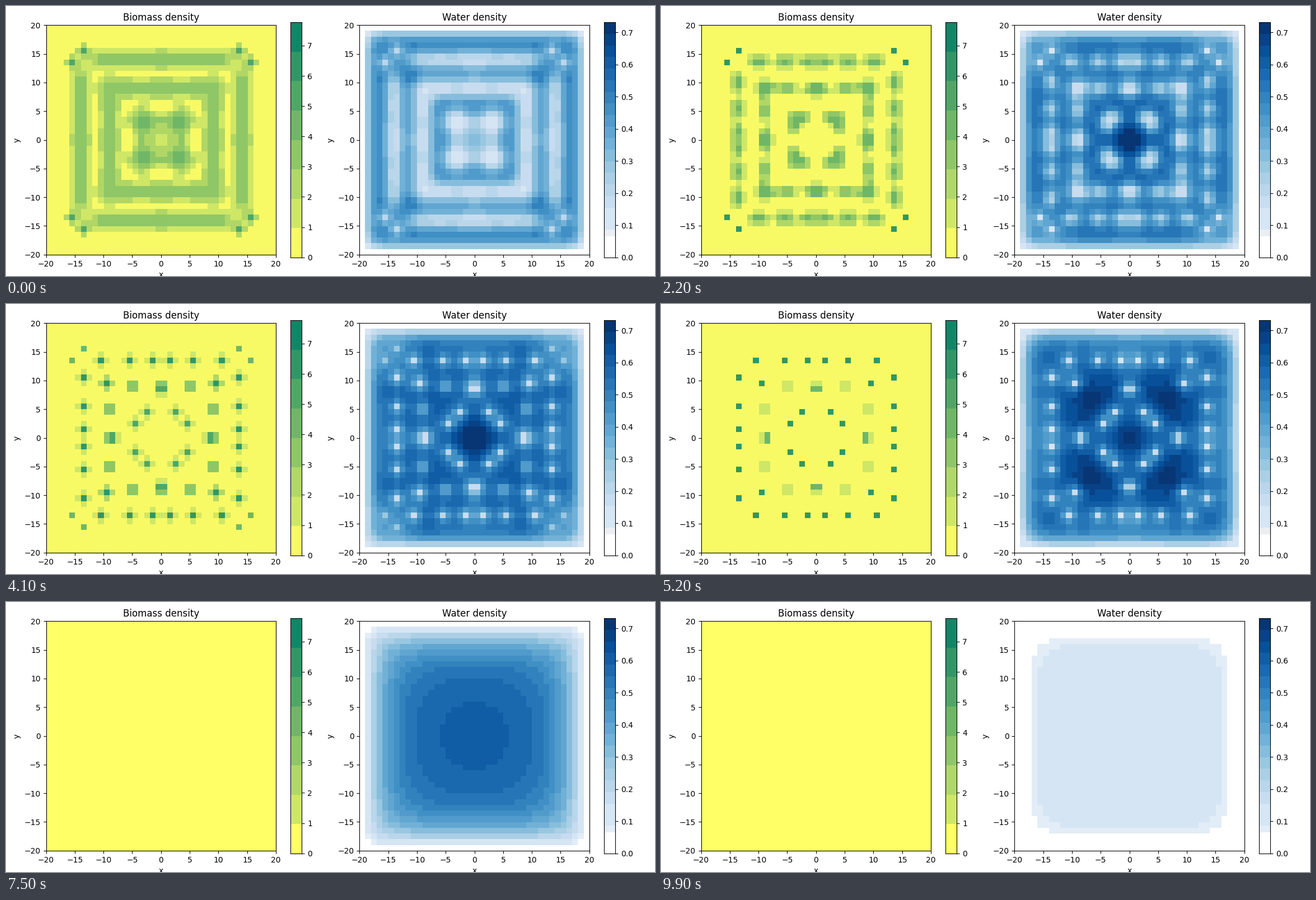
A matplotlib script that plays this animation: 1159x483 px, repeating every 10 s.

```python
import numpy as np
import matplotlib.pyplot as plt
from matplotlib.animation import FuncAnimation
from matplotlib.colors import BoundaryNorm, ListedColormap

W, H, DPI = 1159, 483, 100
FRAMES, STEP = 100, 100
N = 20                      # cells per quadrant side
V_MAX, W_MAX = 7.77, 0.7315
BARE = 7.4                  # seconds until the last plant is gone

# Clumps on square rings: start (across, along), end, birth, death in seconds.
CLUMPS = [
    ((14, 1.2), (13.5, 1.5), 0, 6.9),
    ((14, 5.5), (13.5, 5.5), 0, 6.9),
    ((14, 9.5), (13.5, 10.5), 0, 6.9),
    ((15.5, 13.5), (15.5, 13.5), -4, 4.4),
    ((9, 0), (8.7, 0), 0, BARE),
    ((9, 5), (9, 5), 0, 6.9),
    ((9, 7.5), (9.5, 9.5), 0, 6.9),
    ((3.3, 3), (4.5, 2.5), 0, 7.2),
]

# Shape of a clump over its life: a band shrinks to one dense cell.
AGES = [0, 0.22, 0.45, 0.75, 1]
ACROSS = [1.65, 1.1, 1.1, 0.6, 0.55]
ALONG = [3.5, 2.2, 1.15, 0.6, 0.55]
PEAK = [3.8, 4.3, 5.4, 6.4, 5.8]

CELL = np.arange(N) + 0.5
I, J = np.meshgrid(CELL, CELL, indexing="ij")


def smooth(x):
    x = np.clip(x, 0, 1)
    return x * x * (3 - 2 * x)


def biomass(t):
    """One quadrant: clumps mirrored in the axes and in the diagonal."""
    square, total, weighted = (np.zeros((N, N)) for _ in range(3))
    for start, end, birth, death in CLUMPS:
        age = (t - birth) / (death - birth)
        alive = np.clip((death - t) / 0.4, 0, 1)
        a, b = np.array(start) + smooth(age / 0.6) * np.subtract(end, start)
        wide, deep, peak = (np.interp(age, AGES, c) for c in (ALONG, ACROSS, PEAK))
        for side in (b, -b):
            g = alive * np.exp(-((I - a) / deep) ** 2 - ((J - side) / wide) ** 2)
            for part in (g, g.T):
                square += part ** 2
                total += part
                weighted += peak * part
    heart = 1.6 * max(0, 1 - t) * np.exp(-(I ** 2 + J ** 2) / 9)
    return weighted / (total + 1e-9) * np.minimum(1, np.sqrt(square)) + heart


# Water balance: rain - evaporation - uptake + diffusion, zero at the border.
M = N - 1
T = np.diag(np.full(M, -2.0)) + np.eye(M, k=1) + np.eye(M, k=-1)
T[0, 0] = -1
LAP = np.kron(T, np.eye(M)) + np.kron(np.eye(M), T)
DIFFUSION = 16


def water(t, b):
    rain = np.interp(t, [0, 3.1, 5.2, BARE, 9.9], [2.35, 1.8, 1.4, 0.635, 0.155])
    uptake = 0.43 * b[:M, :M].ravel() ** 3
    w = np.linalg.solve(np.diag(1 + uptake) - DIFFUSION * LAP, np.full(M * M, rain))
    return np.pad(w.reshape(M, M), ((0, 1), (0, 1)))


def mirror(q):
    half = np.hstack([q[:, ::-1], q])
    return np.vstack([half[::-1], half])


V_EDGES = np.linspace(0, V_MAX, 9)
W_EDGES = np.r_[0, 0.066, 0.086, np.linspace(0.155, W_MAX, 17)]


def mids(edges):
    return (edges[1:] + edges[:-1]) / 2


def palettes(name, edges, early, late):
    """Two stepped colormaps that differ in the first colours."""
    maps = []
    for first in (early, late):
        colors = plt.get_cmap(name)(mids(edges) / edges[-1])[:, :3]
        colors[:len(first)] = np.array(first) / 255
        maps.append(ListedColormap(colors))
    return maps


V_MAPS = palettes("summer_r", V_EDGES, [(248, 250, 101)], [(255, 255, 102)])
W_MAPS = palettes("Blues", W_EDGES, [(255, 255, 255), (235, 238, 243)],
                  [(255, 255, 255), (226, 237, 247)])

fig = plt.figure(figsize=(W / DPI, H / DPI), dpi=DPI, facecolor="white")


def add_axes(x0, x1, y0, y1):
    return fig.add_axes([x0 / W, 1 - y1 / H, (x1 - x0) / W, (y1 - y0) / H])


def panel(title, x0, bar_x, edges, maps, ticks, fmt):
    norm = BoundaryNorm(edges, len(edges) - 1)
    ax = add_axes(x0, x0 + 410.6, 34.2, 444.8)
    img = ax.imshow(np.zeros((2 * N, 2 * N)), extent=(-N, N, -N, N), origin="lower",
                    cmap=maps[0], norm=norm, interpolation="nearest", aspect="auto")
    ax.set_title(title)
    ax.set_xlabel("x")
    ax.set_ylabel("y")
    ax.set_xticks(range(-N, N + 1, 5))
    ax.set_yticks(range(-N, N + 1, 5))

    cax = add_axes(bar_x, bar_x + 20.6, 29.3, 449.7)
    bar = cax.pcolormesh([0, 1], edges, mids(edges)[:, None], cmap=maps[0], norm=norm)
    cax.set_xticks([])
    cax.yaxis.tick_right()
    cax.set_yticks(ticks, [fmt % v for v in ticks])
    cax.set_ylim(0, edges[-1])
    return img, bar


plant_img, plant_bar = panel("Biomass density", 71.5, 507.8, V_EDGES, V_MAPS,
                             np.arange(8), "%d")
water_img, water_bar = panel("Water density", 631.2, 1067.6, W_EDGES, W_MAPS,
                             np.arange(8) / 10, "%.1f")


def update(frame):
    t = frame * STEP / 1000
    b = biomass(t)
    plant_img.set_data(mirror(b))
    water_img.set_data(mirror(water(t, b)))
    late = int(t >= BARE)
    for art in (plant_img, plant_bar):
        art.set_cmap(V_MAPS[late])
    for art in (water_img, water_bar):
        art.set_cmap(W_MAPS[late])
    return plant_img, plant_bar, water_img, water_bar


anim = FuncAnimation(fig, update, frames=FRAMES, interval=STEP, repeat=True,
                     repeat_delay=0, blit=False)
plt.show()
```
